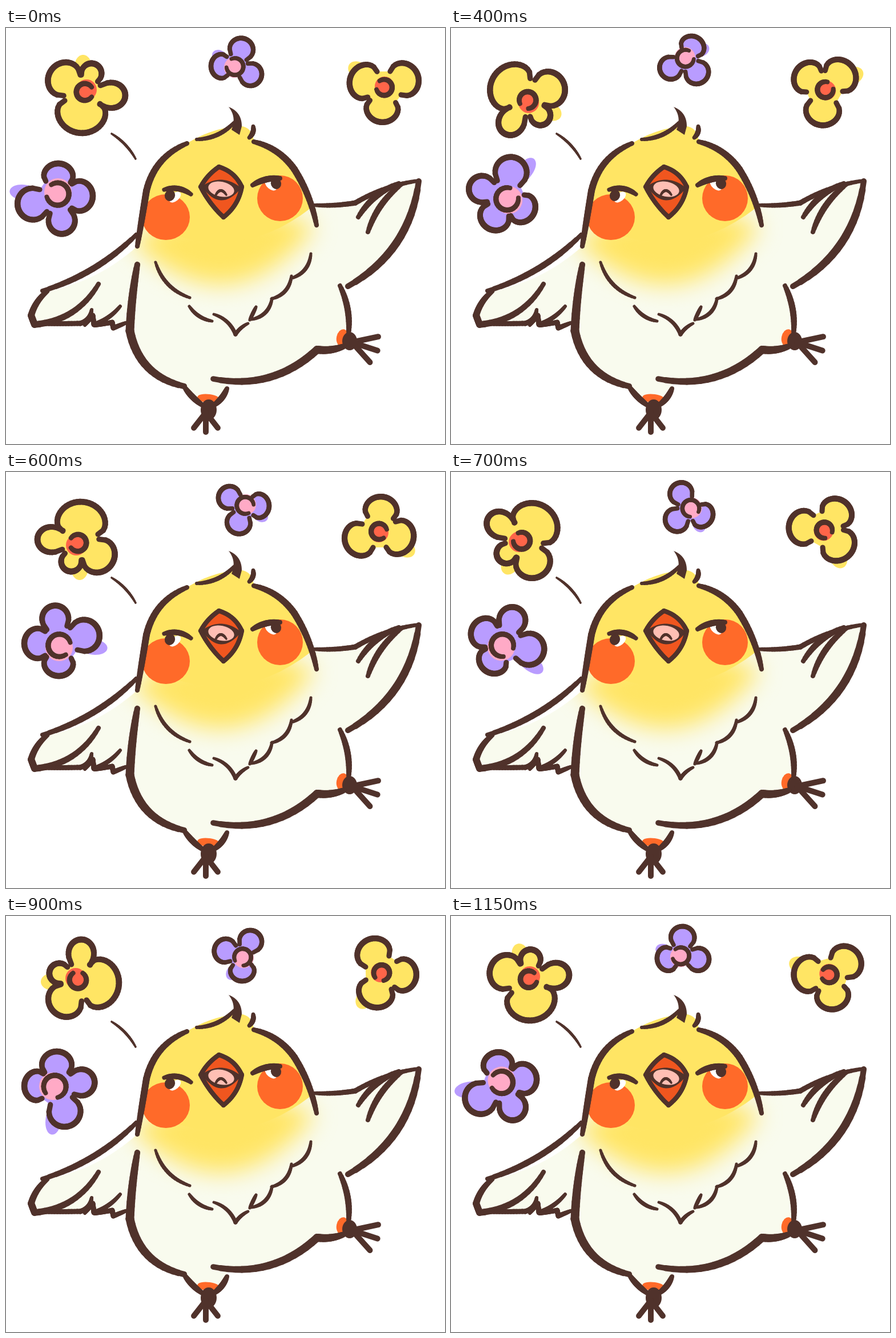
Write an HTML page with a canvas that moves like this. It is 769x728 px and loops after 1.2 s.

```html
<!DOCTYPE html>
<html lang="en">
<head>
<meta charset="utf-8">
<title>Dancing cockatiel</title>
<style>
html, body { margin: 0; width: 100%; height: 100%; overflow: hidden; background: #fff; }
canvas { display: block; }
</style>
</head>
<body>
<canvas id="stage" width="769" height="728"></canvas>
<script>
const W = 769, H = 728, RAD = Math.PI / 180;
const INK = '#50322b', YELLOW = '#ffe564', PURPLE = '#b99cff', PINK = '#ffaac6',
      CORAL = '#ff6549', ORANGE = '#ff6a29', CREAM = '#f9fbee';
const view = document.getElementById('stage').getContext('2d');
let c = view;

const polar = (x, y, r, deg) => [x + r * Math.cos(deg * RAD), y + r * Math.sin(deg * RAD)];
const sample = (n, fn) => Array.from({ length: n + 1 }, (_, i) => fn(i / n));

// Points along edges given as x, y, bend: each edge bulges by bend to the left of its travel
function bent(p, closed) {
  const out = [];
  const last = closed ? p.length : p.length - 2;
  for (let i = 0; i < last; i += 3) {
    const [x, y, bend = 0] = p.slice(i, i + 3);
    const j = (i + 3) % (closed ? p.length : Infinity);
    const dx = p[j] - x, dy = p[j + 1] - y, len = Math.hypot(dx, dy);
    out.push(...sample(16, t => {
      const b = 4 * bend * t * (1 - t) / len;
      return [x + dx * t + dy * b, y + dy * t - dx * b];
    }));
  }
  return out;
}

function trace(points) {
  c.beginPath();
  points.forEach(p => c.lineTo(...p));
  c.closePath();
}

function fill(color, points) {
  trace(points);
  c.fillStyle = color;
  c.fill();
}

function oval(color, x, y, rx, ry = rx, turn = 0) {
  c.beginPath();
  c.ellipse(x, y, rx, ry, turn, 0, 7);
  c.fillStyle = color;
  c.fill();
}

// Ink line that thins to w * tip at both ends
function ink(points, w, tip = .6) {
  const n = points.length - 1;
  c.strokeStyle = INK;
  c.lineCap = 'round';
  for (let i = 0; i < n; i++) {
    c.lineWidth = w * (tip + (1 - tip) * Math.sqrt(Math.sin(Math.PI * (i + .5) / n)));
    c.beginPath();
    c.moveTo(...points[i]);
    c.lineTo(...points[i + 1]);
    c.stroke();
  }
}
const brush = (w, ...p) => ink(bent(p), w);

function plumage() {
  const skull = [246,285,14, 317,202,5, 402,172,10, 434,197,8, 505,247,5];
  const body = bent([230,382,0, ...skull, 534,308,-2, 612,306,6, 724,267,28, 599,452,0,
    586,455,6, 600,535,0, 585,558,3, 545,563,18, 388,622,0, 374,655,0, 338,652,0, 312,627,22,
    217,530,0, 210,518,0, 48,519,3, 44,501,4, 72,461,-12], true);
  fill(CREAM, body);
  c.save();
  trace(body);
  c.clip();
  c.filter = 'blur(20px)';
  fill(YELLOW, bent([218,372,40, 542,346,90], true));
  c.restore();
  fill(YELLOW, bent([236,335,0, ...skull, 534,315,50], true));
}

function eye(x, y, side) {
  oval('#fff', x + 9 * side, y + 3, 12, 7, -.7 * side);
  oval(INK, x, y, 9, 10, .4 * side);
}

function face() {
  oval(ORANGE, 280, 331, 42, 40);
  oval(ORANGE, 480, 298, 40);
  eye(287, 293, 1);
  eye(473, 272, -1);
  brush(10, 277,283,6, 324,291);
  brush(11, 432,275,4, 480,263);

  const beak = [341,278,3, 373,243,6, 413,278,6, 381,331,3];
  fill('#f0561f', bent(beak, true));
  fill(INK, bent([343,277,13, 412,280,23], true));
  oval('#ffbfb4', 377, 282, 23, 13, .2);
  ink(bent(beak, true), 8, 1);
  brush(5, 367,293,8, 386,292);
}

function fluff() {
  brush(7, 262,410,-11, 322,472);
  brush(7, 321,487,-5, 361,513);
  brush(7, 364,501,6, 402,536,2, 424,517);
  brush(7, 438,488,0, 427,511);
  for (let i = 0; i < 3; i++) brush(7, 430 + 35 * i, 510 - 36 * i, -9, 466 + 34 * i, 473 - 39 * i);
}

function toes(x, y, dir, spread, reach) {
  for (let i = -1; i < 2; i++) ink([[x, y], polar(x, y, reach, dir + i * spread)], 10, .9);
}

function feet() {
  oval(ORANGE, 589, 542, 10, 15, .2);
  oval(INK, 602, 548, 13, 16);
  toes(606, 550, 18, 30, 47);

  oval(ORANGE, 356, 649, 21, 8, .15);
  brush(11, 313,629,-2, 344,660);
  brush(11, 387,631,3, 364,660);
  oval(INK, 355, 668, 14, 18);
  toes(350, 673, 90, 38, 34);
}

function outlines() {
  // head and crest
  brush(12, 317,202,-14, 246,285,0, 230,382);
  brush(12, 434,199,8, 505,247,5, 544,345);
  brush(8, 334,195,-8, 402,163);
  fill(INK, bent([390,138,7, 413,172,0, 409,187,0, 395,178,-6], true));
  brush(9, 433,172,3, 426,192);
  brush(5, 185,185,4, 227,229);

  // right wing
  brush(9, 540,310,-2, 612,306,6, 724,267);
  brush(14, 723,268,28, 599,452);
  brush(11, 688,272,-8, 617,331);
  brush(11, 692,274,-8, 634,357);

  // left wing
  brush(11, 228,362,12, 64,460);
  brush(12, 72,461,-4, 44,503,0, 50,519,-17, 162,448);
  brush(9, 50,518,0, 130,517,-5, 150,493);
  brush(9, 138,520,0, 152,503,0, 154,519,-4, 200,487);
  brush(9, 155,521,0, 186,515,0, 188,525,0, 210,516);

  // belly and leg
  brush(15, 230,414,-2, 217,530,-22, 312,627);
  brush(14, 592,557,3, 545,563,24, 363,614);
  brush(11, 585,451,6, 600,535);
}

const backdrop = document.createElement('canvas');
backdrop.width = W;
backdrop.height = H;
c = backdrop.getContext('2d');
c.fillStyle = '#fff';
c.fillRect(0, 0, W, H);
plumage();
face();
fluff();
feet();
outlines();
c = view;

// Petals: direction, reach, half spread in degrees; spill: colour that leaves the outline
const flowers = [
  { pivot: [132, 118], mid: [135, 116], inner: 34, color: YELLOW, heart: [CORAL, 141, 108, 18], ring: 0,
    petals: [[2, 74, 29], [95, 68, 66], [219, 70, 43], [292, 57, 27]], spill: [270, 69, 20] },
  { pivot: [92, 297], mid: [90, 294], inner: 33, color: PURPLE, heart: [PINK, 91, 287, 24], ring: 200,
    petals: [[0, 62, 40], [80, 67, 33], [162, 72, 38], [273, 57, 41]], spill: [186, 84, 16] },
  { pivot: [410, 63], mid: [402, 66], inner: 22, color: PURPLE, heart: [PINK, 400, 69, 18], ring: 210,
    petals: [[30, 50, 40], [178, 43, 48], [290, 50, 42]], spill: [210, 46, 22] },
  { pivot: [658, 104], mid: [662, 106], inner: 32, color: YELLOW, heart: [CORAL, 663, 102, 17], ring: 200,
    petals: [[95, 59, 45], [200, 62, 48], [335, 64, 45]], spill: [215, 74, 20] }
];

function petal({ mid, inner }, [dir, reach, half]) {
  return sample(30, u => polar(...mid,
    inner + (reach - inner) * Math.sqrt(Math.abs(Math.sin(Math.PI * u))), dir + half * (2 * u - 1)));
}

function drawFlower(f, angle) {
  const [x, y] = f.pivot, w = 5 + f.inner / 6;
  const [, hx, hy, hr] = f.heart;
  const outline = f.petals.map(p => petal(f, p));
  c.save();
  c.translate(x, y);
  c.rotate(angle);
  c.translate(-x, -y);
  fill(f.color, petal(f, f.spill));
  fill(f.color, outline.flat());
  oval(...f.heart);
  outline.forEach(p => ink(p, w, .85));
  const rx = (hx + f.mid[0]) / 2, ry = (hy + f.mid[1]) / 2;
  ink(sample(24, u => polar(rx, ry, hr * .82, f.ring + 35 + 290 * u)), w * .9, .8);
  c.restore();
}

// One clockwise turn in 24 steps of 50 ms
function frame() {
  const step = Math.floor(performance.now() % 1200 / 50);
  c.drawImage(backdrop, 0, 0);
  flowers.forEach(f => drawFlower(f, step * Math.PI / 12));
  requestAnimationFrame(frame);
}
frame();
</script>
</body>
</html>
```
